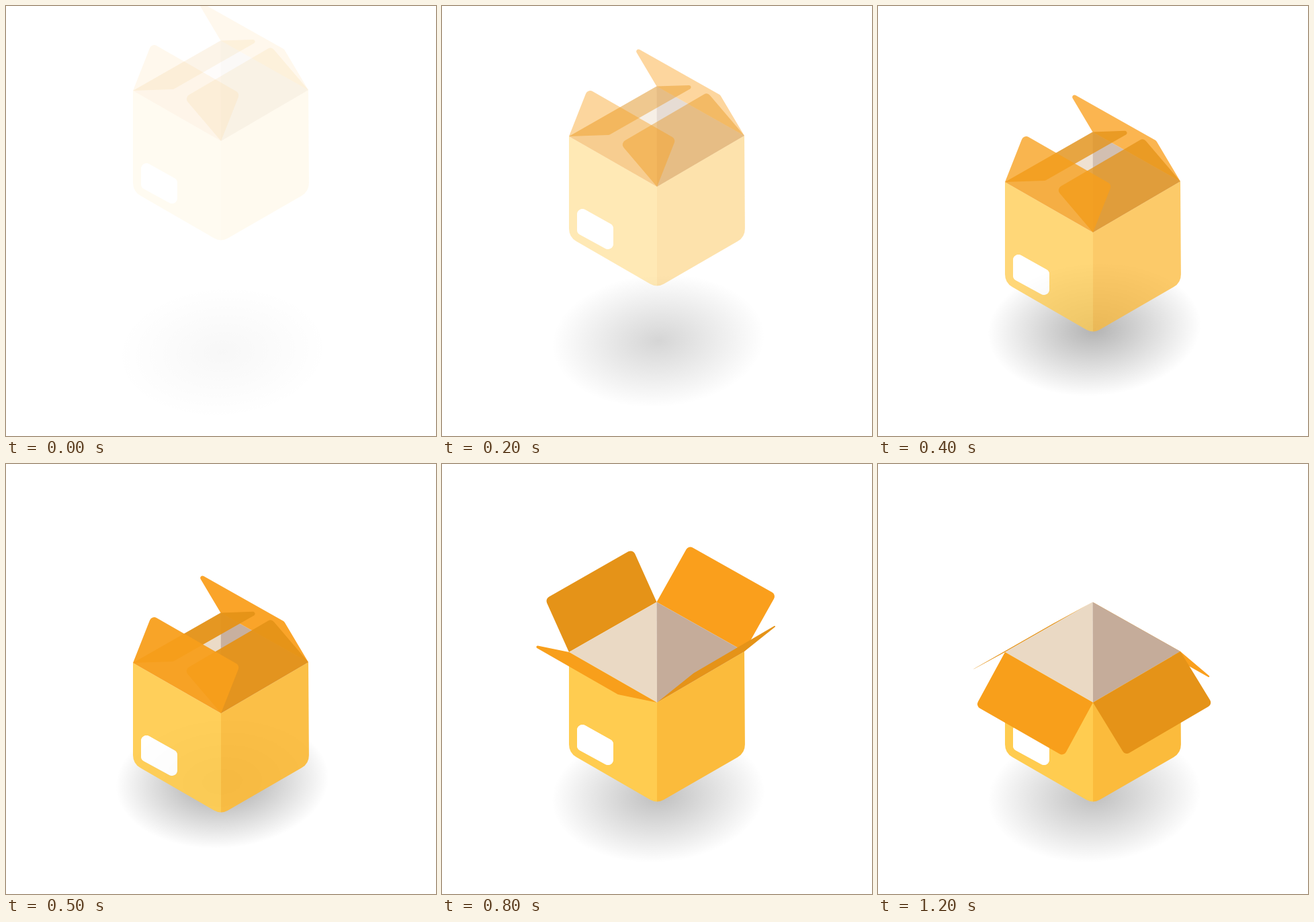
Animation, 640 px wide and 640 px high, one loop 3600 ms. Source, as an HTML page with a canvas:

```html
<!DOCTYPE html>
<html lang="en">
<head>
<meta charset="utf-8">
<title>Opening box</title>
<style>
  html, body { margin: 0; width: 100%; height: 100%; overflow: hidden; background: #fff; }
  canvas { display: block; width: 640px; height: 640px; }
</style>
</head>
<body>
<canvas id="stage" width="640" height="640"></canvas>
<script>
const ctx = document.getElementById('stage').getContext('2d');
const LOOP = 3600, STEP = 100, LAST = 1200;

// Rim corners of the box at rest
const left = [189, 280], back = [319.5, 205.5], right = [450, 279], front = [320, 355];

// A flap hinges on a-b; its key points say how far the outer edge lies
// from the hinge when closed, raised, flat and hanging
const flap = (a, b, color, ...keys) => ({ a, b, color, keys });
const backRight = flap(back, right, '#fa9f1c', [-36, -60.5], [47.5, -84.5], [59, -38], [52, 44]);
const backLeft = flap(left, back, '#e59318', [60, -2], [-35.5, -79], [-59, -39], [-57, 31]);
const frontRight = flap(front, right, '#e59318', [-55, -64.5], [55, -44], [65.5, 40], [48, 78.5]);
const frontLeft = flap(left, front, '#f89f1b', [28, -71], [-58, -12], [-67, 40], [-43.5, 80]);

const progress = (t, from, to) => Math.max(0, Math.min(1, (t - from) / (to - from)));
const add = (p, q) => [p[0] + q[0], p[1] + q[1]];

// Hermite curve through the key points; a flap leaves its closed place sideways
function swing(keys, u) {
  const i = Math.min(Math.floor(u), keys.length - 2), k = u - i;
  const slope = (n, axis) => {
    if (n === 0 && axis === 1) return 0;
    const next = keys[n === 0 ? 2 : Math.min(n + 1, keys.length - 1)];
    return (next[axis] - keys[Math.max(n - 1, 0)][axis]) / 2;
  };
  const blend = k * k * (3 - 2 * k);
  return [0, 1].map(axis => keys[i][axis] * (1 - blend) + keys[i + 1][axis] * blend
    + k * (1 - k) * ((1 - k) * slope(i, axis) - k * slope(i + 1, axis)));
}

// Rounds with radius 7, but takes at most 12 off either side of a sharp tip
function roundCorner(from, p, to) {
  const ax = from[0] - p[0], ay = from[1] - p[1], bx = to[0] - p[0], by = to[1] - p[1];
  const cos = (ax * bx + ay * by) / (Math.hypot(ax, ay) * Math.hypot(bx, by));
  const halfTan = Math.sqrt(Math.max(0, 1 - cos) / (1 + cos));
  ctx.arcTo(...p, ...to, Math.min(7, 12 * halfTan));
}

function fill(color, rule = 'nonzero') {
  ctx.fillStyle = color;
  ctx.fill(rule);
}

function drawTriangle(color, ...points) {
  ctx.beginPath();
  points.forEach(p => ctx.lineTo(...p));
  fill(color);
}

function drawFlap({ a, b, color, keys }, u) {
  const offset = swing(keys, u);
  const p = add(a, offset), q = add(b, offset);
  ctx.beginPath();
  ctx.moveTo(...a);
  roundCorner(a, p, q);
  roundCorner(p, q, b);
  ctx.lineTo(...b);
  fill(color);
}

function facePath(rim, x) {
  const side = Math.sign(x - 320);
  ctx.beginPath();
  ctx.moveTo(...front);
  ctx.lineTo(...rim);
  ctx.arcTo(x, 430, 320, 505.5, 22);
  ctx.lineTo(320 + side * 10, 499.7);
  ctx.quadraticCurveTo(320 + side * 5, 502.5, 320, 502.5);
  ctx.closePath();
}

function labelPath() {
  const corners = [[201, 382.5], [255, 412.5], [255, 453.5], [201, 424]];
  ctx.moveTo(228, 397.5);
  for (let i = 1; i <= 4; i++) ctx.arcTo(...corners[i % 4], ...corners[(i + 1) % 4], 8);
  ctx.closePath();
}

function drawFaces() {
  // The label sits in a hole of the left face
  facePath(left, 189);
  labelPath();
  fill('#ffcc50', 'evenodd');
  ctx.beginPath();
  labelPath();
  fill('#fff');
  facePath(right, 451);
  fill('#fbbb3c');
}

function drawInside() {
  drawTriangle('#ead9c4', left, back, front);
  drawTriangle('#c5ac9a', back, right, front);
}

function drawShadow(y, depth) {
  const glow = ctx.createRadialGradient(0, 0, 0, 0, 0, 1);
  glow.addColorStop(0, `rgba(0,0,0,${depth})`);
  glow.addColorStop(1, 'rgba(0,0,0,0)');
  ctx.save();
  ctx.translate(322, y);
  ctx.rotate(-0.07);
  ctx.scale(159, 99);
  ctx.fillStyle = glow;
  ctx.fillRect(-1, -1, 2, 2);
  ctx.restore();
}

function draw(t) {
  const fall = progress(t, 0, 534), rise = progress(t, 600, 800);
  const open = progress(t, 560, 800) + 2 * progress(t, 800, LAST);

  ctx.globalAlpha = 1;
  ctx.fillStyle = '#fff';
  ctx.fillRect(0, 0, 640, 640);
  ctx.globalAlpha = 0.08 + 0.92 * fall;
  drawShadow(515 - 45 * fall + 24 * rise, 0.39 - 0.14 * rise);

  ctx.save();
  ctx.translate(0, -154 + 181.5 * fall - 27.5 * rise);
  const drawBack = () => [backRight, backLeft].forEach(f => drawFlap(f, open));
  // Once past upright, the back flaps fall behind the box
  const behind = open > 0.5;
  if (behind) drawBack();
  drawInside();
  drawFaces();
  if (!behind) drawBack();
  drawFlap(frontRight, open);
  drawFlap(frontLeft, open);
  ctx.restore();
}

const start = performance.now();
function tick() {
  const t = (performance.now() - start) % LOOP;
  draw(Math.min(LAST, Math.floor(t / STEP) * STEP));
  requestAnimationFrame(tick);
}
tick();
</script>
</body>
</html>
```
